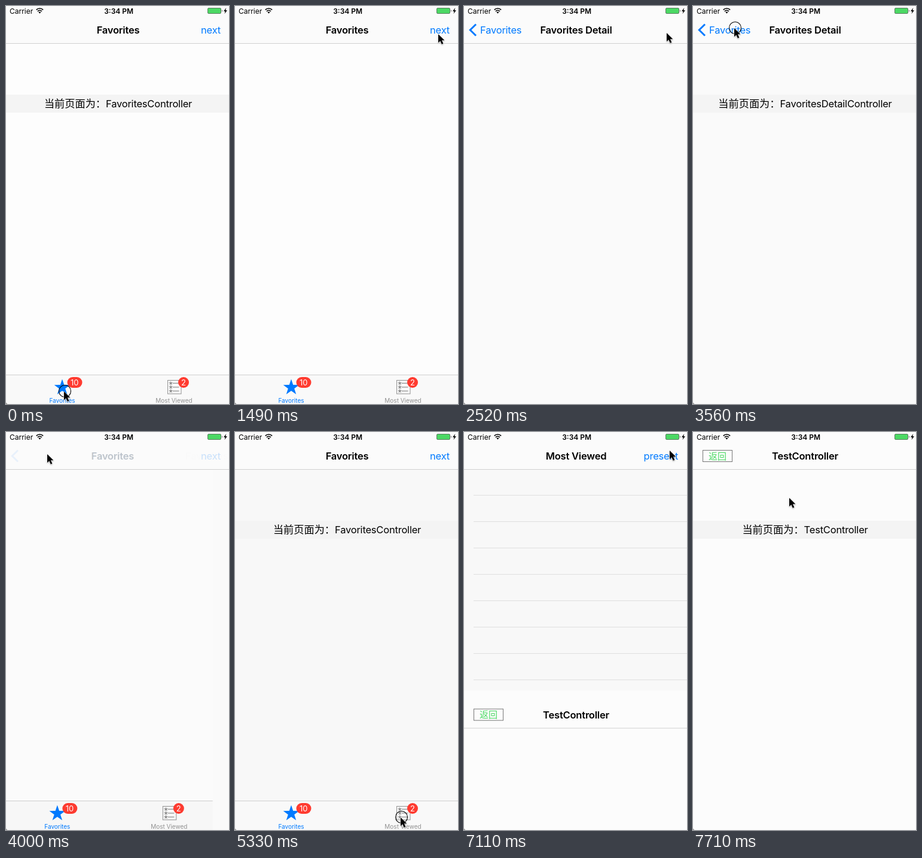
Write an HTML page that moves like this. It is 373 by 664 pixels and loops after 8000 ms.

```html
<!DOCTYPE html>
<html lang="zh-CN">
<head>
<meta charset="utf-8">
<title>Tab and navigation demo</title>
<style>
html, body { margin: 0; width: 100%; height: 100%; overflow: hidden; background: #fdfdfd; }
svg { display: block; width: 373px; height: 664px; }
text { font: 16.5px Inter, "Noto Sans CJK SC", "Noto Sans CJK", sans-serif; letter-spacing: -.2px; }
.mid { text-anchor: middle; }
.end { text-anchor: end; }
.title { font-weight: 600; text-anchor: middle; }
.blue { fill: #007aff; }
.small { font-size: 12px; letter-spacing: 0; }
.tab { font-size: 10px; letter-spacing: 0; text-anchor: middle; }
.badge { font-size: 13px; letter-spacing: 0; text-anchor: middle; fill: #fff; }
.cjk { font-family: "Noto Sans CJK SC", "Noto Sans CJK", sans-serif; font-size: 17.2px; letter-spacing: 0; }
.rule { stroke: #d0d0d0; fill: none; }
.arrow { stroke: #fff; paint-order: stroke; filter: drop-shadow(0 1px 1px rgba(0, 0, 0, .3)); }
</style>
</head>
<body>
<svg viewBox="0 0 373 664">
  <g id="root">
    <rect id="rootBg" width="373" height="664" fill="#fdfdfd"/>
    <path id="rows" class="rule" style="stroke:#dfdfdf"/>
    <g id="tabs">
      <rect y="615" width="373" height="49" fill="#f9f9f9"/>
      <path class="rule" d="M0 615.5H373"/>
      <path id="star"/>
      <text id="favTab" class="tab" x="94" y="661.5">Favorites</text>
      <g id="list">
        <rect id="listBox" x="270.5" y="624.5" width="22.5" height="22.5"/>
        <path id="listRows" stroke-width="1.2"/>
      </g>
      <text id="mostTab" class="tab" x="281" y="661.5">Most Viewed</text>
      <g fill="#ff3b30">
        <rect x="102.5" y="619" width="25" height="18" rx="9"/>
        <circle cx="297" cy="628" r="9"/>
      </g>
      <text class="badge" x="114.7" y="632.7">10</text>
      <text class="badge" x="297" y="632.7">2</text>
    </g>
    <rect id="dim" width="373" height="664"/>
  </g>
  <rect id="detail" width="373" height="664" fill="#fafafa"/>

  <g id="nav">
    <rect id="navBg" width="373" height="62" fill="#fbfbfb"/>
    <path class="rule" d="M0 62.5H373"/>
    <text id="favTitle" class="title" x="187.5" y="46">Favorites</text>
    <text id="next" class="blue end" x="359" y="46">next</text>
    <text id="detailTitle" class="title" x="187.5" y="46">Favorites Detail</text>
    <path id="chevron" d="M20 30.5L10.3 40L20 49.5" fill="none" stroke="#007aff" stroke-width="3"/>
    <text id="back" class="blue" x="27" y="46">Favorites</text>
    <g id="mostNav">
      <text class="title" x="187.5" y="46">Most Viewed</text>
      <text class="blue end" x="358.3" y="46">present</text>
    </g>
  </g>

  <g id="modal">
    <rect width="373" height="664" fill="#fcfcfc"/>
    <path class="rule" d="M0 62.5H373"/>
    <text class="title" x="187.5" y="46">TestController</text>
    <rect x="16.5" y="30.5" width="49" height="19" fill="none" stroke="#777"/>
    <text class="cjk mid" x="41" y="45.6" style="font-size:15px" fill="#4cd964">返回</text>
  </g>

  <g id="toast">
    <rect y="148" width="373" height="30" fill="#f4f4f4"/>
    <text class="mid" x="187.5" y="169"><tspan class="cjk">当前页面为：</tspan><tspan id="toastName"></tspan></text>
  </g>

  <g id="status">
    <text class="small" x="6" y="12.6">Carrier</text>
    <g fill="none" stroke="#000" stroke-width="1.7">
      <path d="M50.7 6.4a8 8 0 0 1 11.4 0M52.9 8.8a5 5 0 0 1 7 0"/>
    </g>
    <path d="M56.4 12.6L54.4 10.5a2.9 2.9 0 0 1 4 0z"/>
    <text class="small title" x="188.7" y="12.6">3:34 PM</text>
    <rect x="337.5" y="3.5" width="22" height="9" rx="1.5" fill="#4cd964" stroke="#5c7a61"/>
    <path d="M361 6.3q1.6 1.7 0 3.6z"/>
    <path d="M368.4 3L364 8.8H366.7L365.5 13L370 7.2H367.2z"/>
  </g>
  <path d="M0 661.5L2.5 664H0z" fill="#999"/>

  <g id="cursor">
    <circle id="ring" cx="1.5" cy="-.5" r="10" fill="none" stroke="#000" stroke-width="1.1"/>
    <path class="arrow" d="M0 0V14.2L3.3 11.2L5.8 16.8L8.4 15.7L5.9 10.3H10.4z"/>
  </g>
</svg>
<script>
const LOOP = 8000, TICKS = 54, W = 373, H = 664;
const LEAD = 4; // ms by which steps fall early, absorbs 10 ms rounding
const $ = id => document.getElementById(id);

// Pointer stops: tick, x, y; each one holds until the next.
const path = [
  [0, 97, 643], [4, 105, 626], [5, 302, 247], [6, 342, 130], [8, 339, 82], [9, 340, 47],
  [11, 339, 45], [20, 300, 62], [21, 170, 58], [22, 78, 40], [23, 69, 37],
  [30, 80, 62], [31, 128, 170], [32, 200, 331], [33, 290, 465], [34, 353, 640], [35, 277, 643],
  [40, 277, 560], [41, 280, 325], [42, 304, 246], [43, 346, 237], [44, 345, 27], [45, 344, 31],
  [50, 325, 45], [51, 230, 84], [52, 161, 110]
];
const taps = [0, 12, 24, 36, 46];

// Toasts: first tick, end tick, controller name.
const toasts = [
  [0, 6, "Favorites"], [18, 25, "FavoritesDetail"], [29, 37, "Favorites"],
  [37, 43, "MostViewed"], [52, 54, "Test"]
];
const slide = [.35, .75, .927, .987, 1];
const PUSH = 13, POP = 25, SWITCH = 37, PRESENT = 48;

const progress = (tick, start) => tick < start ? 0 : slide[Math.min(tick - start, 4)];
const fadeIn = p => Math.max(0, 1 - 11 * (1 - p));

function starPath(cx, cy, r) {
  let d = "";
  for (let i = 0; i < 10; i++) {
    const a = i * Math.PI / 5, q = i % 2 ? r * .39 : r;
    d += (i ? "L" : "M") + (cx + q * Math.sin(a)).toFixed(2) + " " + (cy - q * Math.cos(a)).toFixed(2);
  }
  return d + "z";
}

function set(id, attrs) {
  for (const k in attrs) $(id).setAttribute(k, attrs[k]);
}
const show = (id, on) => set(id, { display: on ? "inline" : "none" });
const move = (id, x, y = 0) => set(id, { transform: `translate(${x} ${y})` });

let lines = "", marks = "";
for (let y = 105.5; y < 615; y += 44) lines += `M16 ${y}H${W}`;
for (const y of [629.3, 635.8, 642.3]) marks += starPath(275.7, y, 1.9) + `M279 ${y}H289.5`;
set("rows", { d: lines });
set("listRows", { d: marks });
set("star", { d: starPath(94, 636.5, 14) });

function drawTabs(most) {
  const on = "#007aff", off = "#929292";
  set("star", { fill: most ? "none" : on, stroke: most ? off : "none" });
  set("favTab", { fill: most ? off : on });
  set("mostTab", { fill: most ? on : off });
  set("listBox", { fill: most ? on : "none", stroke: most ? on : off });
  set("listRows", { stroke: most ? "#e8f2ff" : off, fill: most ? "#e8f2ff" : off });
}

function drawNav(p, popping, most) {
  const fav = popping ? fadeIn(1 - p) : 1 - p;
  const det = popping ? p : fadeIn(p);
  move("favTitle", -126 * p);
  move("detailTitle", 186 * (1 - p));
  move("back", 126 * (1 - p));
  set("favTitle", { opacity: most ? 0 : fav });
  set("next", { opacity: most ? 0 : fav });
  set("detailTitle", { opacity: det * det });
  set("chevron", { opacity: det });
  set("back", { opacity: det });
  show("mostNav", most);
}

function draw(tick) {
  const popping = tick >= POP, most = tick >= SWITCH;
  const p = popping ? 1 - progress(tick, POP) : progress(tick, PUSH);
  const bg = tick > 27 ? "#f8f8f8" : "#fdfdfd";

  move("root", -.3 * W * p);
  set("rootBg", { fill: bg });
  set("dim", { opacity: .1 * p });
  move("detail", W * (1 - p));
  show("detail", p > 0);
  show("rows", most);
  drawTabs(most);
  drawNav(p, popping, most);

  const up = progress(tick, PRESENT);
  show("modal", up > 0);
  move("modal", 0, H * (1 - up));

  const toast = toasts.find(([a, b]) => tick >= a && tick < b);
  show("toast", !!toast);
  if (toast) $("toastName").textContent = toast[2] + "Controller";

  const [, x, y] = path.filter(s => s[0] <= tick).pop();
  move("cursor", x, y);
  show("ring", taps.includes(tick));
}

const t0 = performance.now();
let last = -1;
function frame() {
  const t = Math.max(0, performance.now() - t0) % LOOP;
  const tick = Math.min(TICKS - 1, Math.floor((t + LEAD) * TICKS / LOOP));
  if (tick !== last) draw(last = tick);
  requestAnimationFrame(frame);
}
frame();
</script>
</body>
</html>
```
